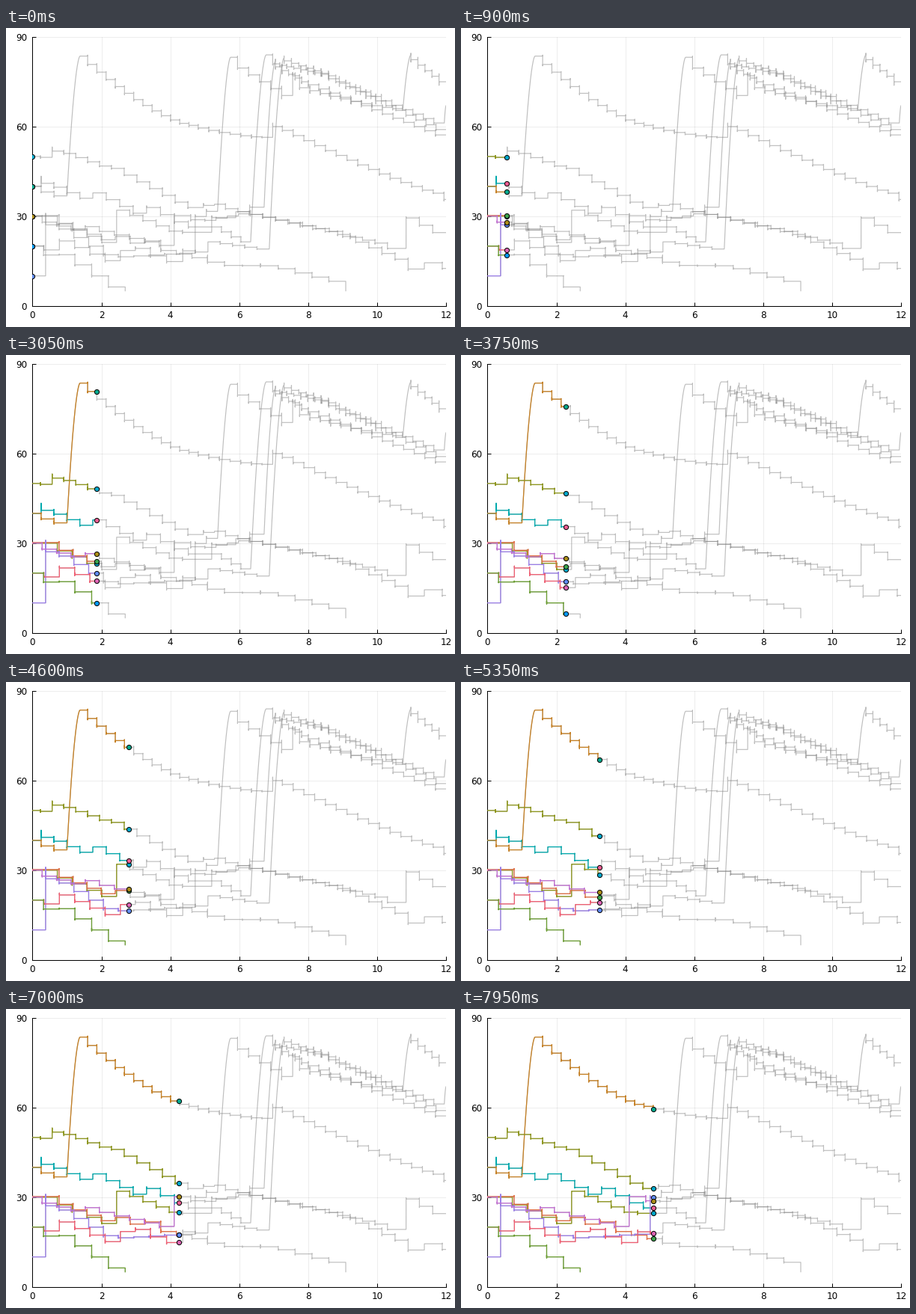
These frames come from a looping animation (600 px wide and 400 px high, 8 s). A matplotlib script:

```python
import random
import numpy as np
import matplotlib.pyplot as plt
from matplotlib.animation import FuncAnimation

FRAMES, INTERVAL = 160, 50
STEPS_PER_UNIT = 33          # animation frames per unit of the time axis
PT = 0.72                    # points per pixel at 100 dpi

rng = random.Random(4)


class Path:
    """A noisy staircase that can also climb along an eased curve."""

    def __init__(self, value):
        self.t, self.v = 0.0, value
        self.ts, self.vs = [0.0], [value]

    def add(self, t, v):
        self.ts.append(max(t, self.ts[-1] + 4e-4))
        self.vs.append(v)

    def hold(self, end, v, peak=None):
        """Jump to v with a short twitch, then stay level until end."""
        if v != self.v:
            crowded = self.t > 7 and v > 68
            size = rng.uniform(0.3, 1.0) * (1.8 if crowded else 0.8)
            self.add(self.t, self.v + 0.5 * size)
            self.add(self.t, v - 0.7 * size)
            self.add(self.t, peak or v + rng.choice((0, 1)) * size)
        self.add(self.t, v)
        self.add(end, v)
        self.t, self.v = end, v
        return self

    def stairs(self, end, first, last, n, bend=1.0):
        """n equal steps from first to last; bend > 1 slows the change."""
        start = self.t
        for i in range(n):
            ease = 1 - (1 - i / (n - 1)) ** bend
            self.hold(start + (end - start) * (i + 1) / n,
                      first + (last - first) * ease)
        return self

    def rise(self, end, top):
        t, v = self.t, self.v
        for u in np.linspace(0, 1, 30):
            self.add(t + u * (end - t), v + (top - v) * (1 - (1 - u) ** 1.7))
        self.t, self.v = end, top
        return self

    def drop(self, v):
        self.add(self.t, v)
        return self


# (line colour, marker colour, path), in drawing order
TRACKS = [
    ("#8e971d", "#00a8cb", Path(30).hold(.72, 30).stairs(2.44, 27.4, 21.2, 4)
        .stairs(4.35, 32, 25, 5).hold(5.2, 24.6).stairs(6.33, 26.4, 21.4, 4)
        .rise(6.78, 84).hold(6.97, 84).stairs(8.6, 81, 77.5, 8)
        .stairs(11.95, 76, 61.2, 11).rise(12, 67)),
    ("#e26f46", "#3da44d", Path(30).hold(.77, 30.2).stairs(2.4, 27.6, 22.1, 4)
        .stairs(3.27, 23.2, 21, 2).hold(3.72, 21.7).stairs(5.08, 18.5, 16.1, 3)
        .hold(5.57, 14.6, peak=17).stairs(7.13, 13.5, 13.4, 3)
        .stairs(9.09, 12.4, 8.2, 4).drop(5)),
    ("#00a9ad", "#ed5d92", Path(40).hold(.25, 40).hold(.62, 41, peak=43.4)
        .stairs(1.75, 39.7, 36, 3).stairs(3.31, 37.8, 31, 4)
        .stairs(4.52, 32.9, 28.1, 3).hold(5.2, 26.4).hold(5.9, 29.5)
        .stairs(9, 31.5, 24.9, 8).stairs(10.9, 23.2, 15.6, 5)
        .hold(11.37, 12.3).hold(11.89, 14.4).hold(12, 12.5)),
    ("#c68125", "#00a98d", Path(40).hold(.25, 40).stairs(1, 38.1, 36.8, 2)
        .rise(1.38, 83.6).hold(1.6, 83.6).stairs(4.807, 80.8, 60.4, 12, 1.42)
        .stairs(6.97, 59.5, 56.4, 7, 1.6).hold(7.25, 60, peak=61.2)
        .stairs(11.94, 58.7, 37.7, 15, 1.15).hold(12, 35.6)),
    ("#8e971d", "#00a8cb", Path(50).hold(.23, 50).hold(.57, 49.7)
        .hold(.91, 51.8, peak=53.2).stairs(2.29, 51, 46.8, 4)
        .stairs(4.51, 46, 34.7, 6).hold(4.96, 32.9).stairs(5.6, 33.6, 34, 2)
        .stairs(10.3, 32.5, 21, 13).hold(10.84, 19.2)
        .stairs(12, 29.4, 24.5, 3)),
    ("#9b7fe8", "#608cf6", Path(10).hold(.38, 10).hold(.77, 27.1, peak=31)
        .stairs(2.49, 25.7, 17.1, 4).stairs(4.72, 16.4, 17.6, 5)
        .stairs(5.37, 29.9, 31.6, 2).rise(5.75, 83.2).hold(5.95, 83.2)
        .stairs(7.55, 79.6, 70.4, 5).hold(7.75, 77).stairs(10.75, 73, 66, 10, 1.3)
        .rise(10.98, 84).stairs(12, 82.4, 75, 5)),
    ("#c271d2", "#ac8d18", Path(30).hold(.28, 30).stairs(1.53, 28, 25.4, 3)
        .hold(1.94, 26.5).stairs(4.11, 24.9, 20.2, 5).hold(4.59, 30.2)
        .hold(5, 28.8).stairs(6.3, 28.6, 30.8, 4).hold(6.72, 33)
        .rise(7.05, 82).stairs(8, 80, 75, 5).stairs(12, 74, 57.2, 13)),
    ("#f05f73", "#dd64b5", Path(20).hold(.33, 20).hold(.78, 18.7)
        .stairs(2.55, 21.7, 15.1, 4).stairs(3.42, 18.5, 19.2, 2)
        .stairs(4.36, 16.7, 14.8, 2).stairs(5.09, 18.4, 18, 2)
        .stairs(6.87, 21.4, 19, 5).rise(7.3, 83).stairs(8.8, 82, 77, 7)
        .stairs(12, 75, 59, 11)),
    ("#6b9e32", "#009af9", Path(20).hold(.32, 20).stairs(1.23, 17, 17.1, 2)
        .stairs(2.69, 13.7, 6.3, 3).drop(5)),
]

plt.rcParams["font.family"] = "DejaVu Sans"
fig = plt.figure(figsize=(6, 4), dpi=100, facecolor="white")
ax = fig.add_axes([35.4 / 600, 28.4 / 400, 552.6 / 600, 359.6 / 400])
ax.set(xlim=(0, 12), ylim=(0, 90), xticks=range(0, 13, 2), yticks=range(0, 91, 30))
ax.set_axisbelow(True)
ax.grid(color="black", alpha=0.1, lw=0.5)
ax.spines[["top", "right"]].set_visible(False)
for side in ("left", "bottom"):
    ax.spines[side].set_linewidth(PT)
ax.tick_params(direction="in", length=5 * PT, width=PT, labelsize=12 * PT)
ax.tick_params(axis="x", pad=6.5 * PT)
ax.tick_params(axis="y", pad=7.5 * PT)

trails, dots = [], []
for i, (line, fill, path) in enumerate(TRACKS):
    ax.plot(path.ts, path.vs, color="gray", alpha=0.5, lw=1.2 * PT,
            snap=False, zorder=2)
    trails += ax.plot([], [], color=line, lw=1.3 * PT, snap=False,
                      zorder=3 + 0.01 * i)
    dots += ax.plot([], [], "o", ms=6.2 * PT, mfc=fill, mec="black", mew=PT,
                    snap=False, zorder=4 + 0.01 * i)


def update(k):
    now = k / STEPS_PER_UNIT
    for (_, _, path), trail, dot in zip(TRACKS, trails, dots):
        ts, vs = np.array(path.ts), np.array(path.vs)
        past = ts <= now
        if now <= ts[-1]:
            head = np.interp(now, ts, vs)
            trail.set_data(np.append(ts[past], now), np.append(vs[past], head))
            dot.set_data([now], [head])
        else:
            trail.set_data(ts, vs)
            dot.set_data([], [])
    return trails + dots


anim = FuncAnimation(fig, update, frames=FRAMES, interval=INTERVAL,
                     init_func=lambda: update(0), repeat=True, repeat_delay=0)
plt.show()
```
